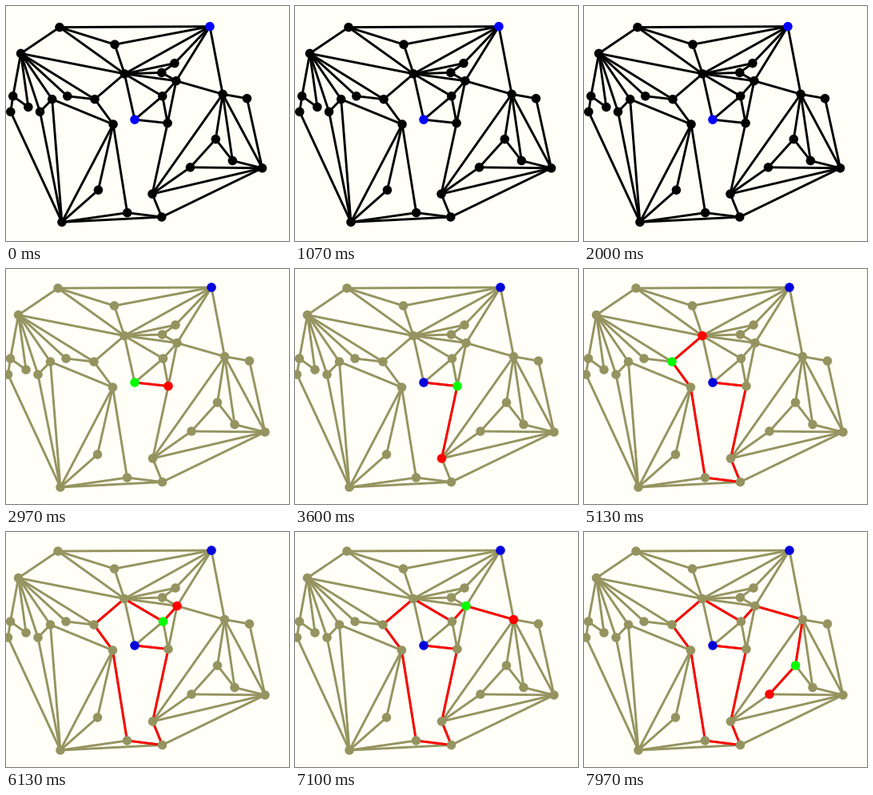
Animation, 354 px wide and 294 px high, one loop 8 s. Source, as a matplotlib script:

```python
import numpy as np
import matplotlib.pyplot as plt
from matplotlib.animation import FuncAnimation
from matplotlib.collections import LineCollection

W, H, DPI = 354, 294, 100
INTERVAL, LOOP = 20, 8000
PX = 72 / DPI  # points per pixel

PAPER, BLACK, OLIVE = "#fffff8", "#000000", "#959460"
RED, GREEN, BLUE, DARK_BLUE = "#ff0000", "#00ff00", "#0000ff", "#0000dc"

NODES = {
    "A": (65, 24), "B": (257, 23), "C": (135.5, 46), "D": (15.5, 57.5),
    "E": (148, 83.5), "F": (212, 70), "G": (195.5, 82), "H": (214, 92.5),
    "I": (196.5, 112), "J": (161, 142), "K": (203, 146.5), "L": (273.5, 109.5),
    "M": (304.5, 115), "N": (264.5, 167), "O": (286, 194.5), "P": (232, 203),
    "Q": (324, 204), "R": (183.5, 237), "S": (195.5, 266.5), "T": (151.5, 261),
    "U": (68, 273), "V": (114.5, 232), "W": (133.5, 148), "X": (110, 116),
    "Y": (75, 112), "Z": (55.5, 116), "a": (40, 132), "b": (25, 126),
    "c": (5.5, 112), "d": (2.5, 132),
}
EDGES = ("AB AC AD AE BC BE BF BH BL CE DE DX DY DZ Da Db Dc "
         "EF EG EH EI EJ EX FG GH HI HK HL IJ IK JK KR "
         "LM LN LO LQ LR MQ NO NP OQ PQ PR QR QS RS ST SU TU TW "
         "UV UW UZ Ua Ud VW WX WZ XY Za bc cd").split()
PATH = "JKRSTWXEIHLNP"
ENDS = "BJ"

# The search walks on a steady beat and lingers on some nodes.
START, BEAT = 2960, 1000 / 3
STEP_BEATS = [0, 1, 2, 3, 4, 5, 6, 8, 9, 11, 13, 14]

names = list(NODES)
index = {name: i for i, name in enumerate(names)}
search = np.array(list(NODES.values()), float)
centre = np.array([160, 148])
overview = centre + (search - centre) * 0.979


def segments(points, pairs):
    return [points[[index[a], index[b]]] for a, b in pairs]


fig = plt.figure(figsize=(W / DPI, H / DPI), dpi=DPI, facecolor=PAPER)
ax = fig.add_axes([0, 0, 1, 1])
ax.set_xlim(0, W)
ax.set_ylim(H, 0)
ax.axis("off")

lines = LineCollection([], linewidths=2.9 * PX, capstyle="round", zorder=1)
trail = LineCollection([], linewidths=2.9 * PX, colors=RED,
                       capstyle="round", zorder=2)
ax.add_collection(lines)
ax.add_collection(trail)
dots = ax.scatter(*overview.T, s=(11.5 * PX) ** 2, linewidths=0, zorder=3)


def draw(frame):
    t = frame * INTERVAL
    steps = sum(t >= START + BEAT * b for b in STEP_BEATS)
    searching = steps > 0
    points = search if searching else overview
    base = OLIVE if searching else BLACK

    colors = dict.fromkeys(names, base)
    colors.update(dict.fromkeys(ENDS, DARK_BLUE if searching else BLUE))
    if searching:
        colors[PATH[steps - 1]] = GREEN
        colors[PATH[steps]] = RED

    walked = list(zip(PATH, PATH[1:]))[:steps]
    lines.set_segments(segments(points, EDGES))
    lines.set_color(base)
    trail.set_segments(segments(points, walked))
    dots.set_offsets(points)
    dots.set_facecolor(list(colors.values()))
    return lines, trail, dots


anim = FuncAnimation(fig, draw, frames=LOOP // INTERVAL, interval=INTERVAL,
                     repeat=True, repeat_delay=0, blit=False)
plt.show()
```
